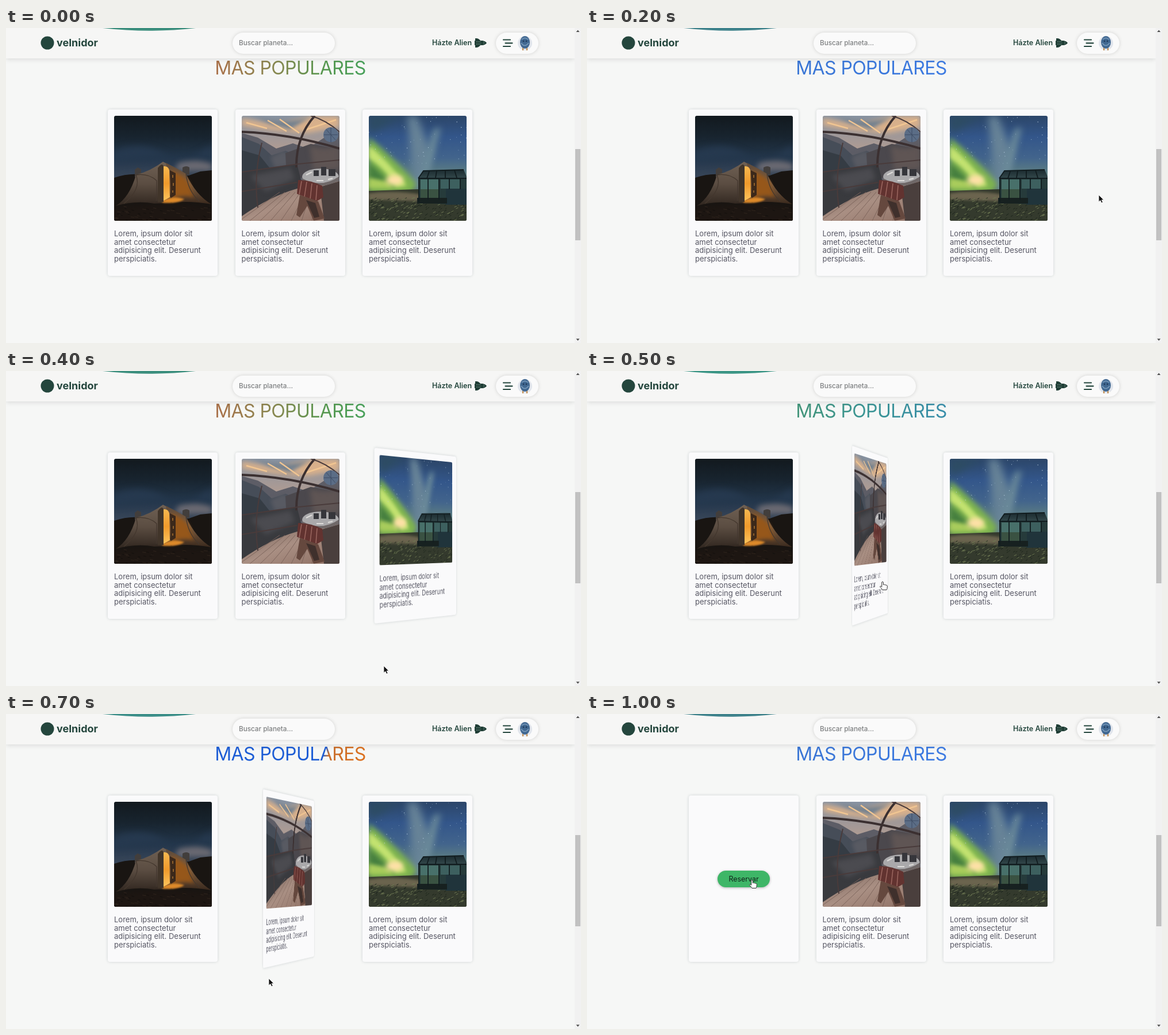
These frames come from a looping animation (1000x549 px, 1100 ms). An HTML page:

```html
<!DOCTYPE html>
<html lang="es">
<head>
<meta charset="utf-8">
<title>Mas populares</title>
<style>
  html, body { margin: 0; width: 100%; height: 100%; overflow: hidden; }
  body { position: relative; background: #f6f7f6; font-family: Inter, "Open Sans", sans-serif; }
  body > *, header > * { position: absolute; }

  header { left: 0; top: 0; width: 989px; height: 53px; background: #f6f6f5; box-shadow: 0 1px 9px rgba(0,0,0,.14); z-index: 2; }
  header svg { left: 0; top: 0; }
  .brand { left: 88px; top: 15px; font: 700 18px/22px Inter, sans-serif; color: #24463d; }
  .search, .menu { box-sizing: border-box; top: 8px; height: 37px; border-radius: 19px; background: #fafafa; box-shadow: 0 0 6px rgba(0,0,0,.15); }
  .search { left: 394px; width: 178px; padding-left: 11px; font: 500 11.7px/37px Inter, sans-serif; color: #7d7f80; }
  .menu { left: 852px; width: 74px; }
  .join { left: 741px; top: 16px; font: 600 12.5px/20px Inter, sans-serif; color: #24463d; }

  h1 { margin: 0; left: 294px; top: 54px; width: 401px; text-align: center; font: 400 32px/32px Inter, sans-serif; letter-spacing: -.6px; }
  h1 span { color: transparent; -webkit-background-clip: text; background-clip: text; }

  .slot { top: 142px; width: 191px; height: 290px; perspective: 1200px; }
  .card { width: 100%; height: 100%; transform-style: preserve-3d; }
  .face { position: absolute; inset: 0; border-radius: 4px; background: #fafafb; box-shadow: 0 0 5px rgba(20,40,50,.17); backface-visibility: hidden; }
  .back { transform: rotateY(180deg); }
  .face svg { position: absolute; left: 11px; top: 11px; border-radius: 3px; }
  .face p { position: absolute; left: 11px; top: 209px; margin: 0; font-size: 13px; line-height: 14.6px; color: #565663; white-space: nowrap; }
  .button { position: absolute; left: 50px; top: 131px; width: 91px; height: 29px; border-radius: 15px; background: #68ca88; text-align: center; font: 400 12.4px/29px Inter, sans-serif; color: #10201a; }
  .button.hover { background: #3eb667; box-shadow: 0 1px 4px rgba(0,0,0,.3); }

  .bar { left: 989px; top: 0; z-index: 3; }
  .pointer { left: 0; top: 0; z-index: 4; overflow: visible; }
</style>
</head>
<body>
<header>
  <svg width="989" height="53">
    <path id="arc" d="M168 0Q250 9.5 330 0Z"/>
    <circle cx="72" cy="26" r="11.5" fill="#24463d"/>
  </svg>
  <div class="brand">velnidor</div>
  <div class="search">Buscar planeta...</div>
  <div class="join">Házte Alien</div>
  <div class="menu"></div>
  <svg width="989" height="53">
    <path d="M816 18h2q4 0 7 4h4q5 1 7 4q-2 3-7 4h-4q-3 4-7 4h-2v-4h-1v-8h1z" fill="#1f3d35"/>
    <path d="M817 24h9M817 28h9M830 24l2 2-2 2" fill="none" stroke="#628176"/>
    <path d="M865 20.5h12M868.5 26.3h12M865 32h12" stroke="#24463d" stroke-width="2.2" stroke-linecap="round"/>
    <circle cx="902.5" cy="26.5" r="12.5" fill="#e1e5ec"/>
    <path d="M899 34v5M906 34v5" stroke="#c18b4c" stroke-width="2"/>
    <ellipse cx="902.5" cy="25" rx="8.5" ry="11" fill="#416891"/>
    <path d="M897 20q5-5 11 0M896 26q6 9 13 0" fill="none" stroke="#7c9dbd" stroke-width="1.5"/>
    <circle cx="900" cy="23" r="1.4" fill="#223c5e"/><circle cx="905" cy="23" r="1.4" fill="#223c5e"/>
  </svg>
</header>

<h1><span id="title">MAS POPULARES</span></h1>

<svg class="bar" width="11" height="549">
  <path d="M0 0h11v549H0z" fill="#f1f1f1"/>
  <path d="M1 211h9v159H1z" fill="#c1c1c1"/>
  <path d="M2.5 7l3-3.5 3 3.5zM2.5 541.5l3 3.5 3-3.5z" fill="#505050"/>
</svg>

<svg class="pointer" width="1" height="1">
  <g id="pointer" stroke-linejoin="round">
    <path id="arrow" d="M0 0V12L2.8 9.5 4.8 13.8 7 12.8 5 8.7H8.7Z" fill="#111" stroke="#fff" stroke-width=".7"/>
    <path id="hand" d="M-1.3 1Q0-.8 1.3 1V5.5Q2.6 4.4 3.8 5.8Q5 5 6 6.3Q7.4 5.6 8.2 7.2V10Q8.2 12.5 7 14.5H0Q-2 11.5-4.3 9.3Q-4.4 7.4-2.6 8L-1.3 9.3Z" fill="#fff" stroke="#333" stroke-width="1"/>
  </g>
</svg>

<script>
const $ = id => document.getElementById(id);
const shape = (d, fill, extra = '') => `<path d="${d}" fill="${fill}" ${extra}/>`;
const line = (d, color, width) => shape(d, 'none', `stroke="${color}" stroke-width="${width}"`);
const soft = n => `style="filter:blur(${n}px)"`;
const gradient = (id, colors, dir = 'x2="0" y2="1"') =>
  `<linearGradient id="${id}" ${dir}>${colors.map((c, i) =>
    `<stop offset="${i / (colors.length - 1)}" stop-color="${c}"/>`).join('')}</linearGradient>`;
const whole = 'M0 0H170V183H0Z';

// Small repeatable generator for stars and grass.
function scatter(count, seed, draw) {
  const random = () => (seed = seed * 16807 % 2147483647) / 2147483647;
  return Array.from({ length: count }, () => draw(random(), random(), random())).join('');
}

const tent =
  gradient('night', ['#12191e', '#18242f', '#23364b', '#3a475a', '#282624', '#171411']) +
  gradient('canvas', ['#6f6053', '#5b4d42', '#30261f']) +
  gradient('flap', ['#5d4a3a', '#7a5c40', '#3b2a1e']) +
  gradient('glow', ['#f7b850', '#f09a2c', '#ffc45c']) +
  shape(whole, 'url(#night)') +
  shape('M0 62Q45 43 85 65T170 50V75Q95 65 0 82Z', '#26394f', soft(6)) +
  shape('M112 82Q145 74 170 84V96H105Z', '#6b6a72', soft(5)) +
  shape('M0 108Q30 98 55 104H130L150 97 170 95V183H0Z', '#191512') +
  shape('M36 94l5-4 6 3v14H36zM119 90q7-4 12 0v13H119z', '#423e3c') +
  shape('M3 157Q27 142 38 103Q64 96 85 80Q92 83 98 88V152L70 153Q38 147 3 157Z', 'url(#canvas)') +
  shape('M90 82Q107 90 125 101Q142 138 169 154Q125 147 101 152Z', 'url(#flap)') +
  shape('M100 95Q122 104 130 117Q135 134 139 142Q118 136 101 146Z', '#96571a', soft(3)) +
  shape('M82 149Q100 138 122 145Q113 153 86 152Z', '#dd8a2a', soft(1.5)) +
  shape('M76 91Q84 81 86 88V150L76 151Z', '#41352a') +
  shape('M86 88Q94 87 96 95L97 142 86 148Z', 'url(#glow)') +
  shape('M97 95l10 5v38l-8 5z', '#3b281a') +
  line('M102 103v5M103 117v5M102 130v4', '#a8702f', 1.5) +
  line('M38 103Q60 100 74 113V148M38 103Q48 128 17 153M125 101Q128 130 148 149', '#43372e', 1.3) +
  shape('M0 161Q70 151 170 159V183H0Z', '#1d1612', soft(3)) +
  scatter(60, 29, (x, y, v) => line(`M${x * 170} ${158 + y * 25}l${3 + v * 4} 1`, v > .5 ? '#2f241c' : '#120f0d', 1));

const dome =
  gradient('dusk', ['#8792a1', '#c6a18a', '#847d7f']) +
  gradient('floor', ['#6d5a52', '#a98f83', '#8d6e62'], 'x2="1" y2="1"') +
  shape(whole, 'url(#dusk)') +
  shape('M0 4L60 15 125 0H170V20L115 30 60 26 0 17Z', '#d8b08b', soft(4)) +
  shape('M20 0Q70 16 118 3L84 24 50 14Z', '#73818f', soft(3)) +
  line('M45 8L78 27M66 6L100 30M112 24L164 7M8 12L44 22', '#f0c592', 2.5) +
  shape('M0 30L28 38 60 57 89 48 115 57 148 35 170 28V120H0Z', '#5d5d66') +
  shape('M0 37L30 49 52 69 76 61 98 70V114H0Z', '#464d58') +
  shape('M0 60L31 69 59 104H0Z', '#353c44') +
  shape('M50 72L75 60 88 88 58 92Z', '#585a62', soft(3)) +
  shape('M76 65L120 49 170 58V108H78Z', '#4b484d') +
  shape('M118 52Q146 62 170 50V94H124Z', '#5f5554', soft(4)) +
  shape('M0 99L96 84 106 123 30 163 0 183Z', '#393a3e') +
  shape('M15 105L85 90 92 110 42 132Z', '#4b4b50', soft(4)) +
  shape('M0 175Q50 140 96 127L170 114V183H0Z', 'url(#floor)') +
  [0, 1, 2, 3, 4, 5, 6, 7].map(i => line(`M${-4 + i * 18} 183L${66 + i * 9} 133`, '#7b635a', .9)).join('') +
  shape('M136 124L170 114V183H143Z', '#4a3f3d') +
  line('M0 28Q82 31 170 57M127 0Q94 37 95 90', '#3b3031', 4) +
  line('M120 0Q146 7 170 28M0 98L98 84 170 77M35 47Q20 105 28 160M0 132L96 116', '#493b3b', 2) +
  '<circle cx="155" cy="33" r="13" fill="#5b6d86"/>' +
  line('M143 33h24M155 20v26M147 24l16 18', '#3f4d64', 1) +
  '<ellipse cx="137" cy="106" rx="32" ry="14" fill="#aaa9ab"/>' +
  shape('M105 109Q138 127 169 106V113Q135 130 106 115Z', '#6f6868') +
  shape('M125 95h9v10h-9zM138 89h9v15h-9zM151 93h12v12h-12z', '#36363b') +
  line('M112 103l10-5M130 113h12M150 111l8-2', '#dedcda', 2) +
  shape('M98 112Q117 111 140 122L142 142 130 149 96 136Z', '#623330') +
  line('M104 114l-4 23M113 115l-4 26M122 118l-3 27M131 121l-2 26', '#9c6860', 1.5) +
  shape('M101 138L133 149 144 179 125 183 114 157 101 177 95 173Z', '#65483e') +
  shape('M112 147L128 152 135 176 126 178Z', '#3f302c');

const aurora =
  gradient('sky', ['#2c4669', '#33568a', '#42648c', '#66877f', '#363f35', '#1f281d']) +
  gradient('roof', ['#1b2a2f', '#33484b']) +
  shape(whole, 'url(#sky)') +
  shape('M0 0H60Q20 18 0 34Z', '#2d4c61', soft(8)) +
  shape('M67 0H83L108 62 92 130H78Z', '#678397', soft(7)) +
  shape('M112 25L125 20 96 132H81Z', '#6d8c9a', soft(6)) +
  shape('M0 38Q43 72 83 119L73 135H0Z', '#7fb54f', soft(5)) +
  shape('M0 52Q32 77 66 122L48 124Q28 92 0 74Z', '#c3e270', soft(3)) +
  shape('M0 82Q22 97 34 116H0Z', '#467f3f', soft(4)) +
  shape('M0 108L36 116 40 126H0Z', '#a9cc5c', soft(3)) +
  `<ellipse cx="45" cy="112" rx="15" ry="9" fill="#ffe0a8" ${soft(4)}/>` +
  scatter(55, 71, (x, y, v) => `<circle cx="${x * 170}" cy="${y * 85}" r="${.3 + v * .4}" fill="#b9cfe0"/>`) +
  shape('M0 131L84 128 170 132V183H0Z', '#343a2d') +
  shape('M0 135Q45 129 95 138V149L0 146Z', '#6b644e', soft(2)) +
  scatter(220, 43, (x, y, v) => line(`M${x * 170} ${144 + y * 39}l${2 + v * 3}-2`, v > .55 ? '#6d7752' : '#1c251b', 1)) +
  shape('M86 109H170V154H134L87 152Z', '#263b3b') +
  shape('M90 111H121V143H90Z', '#48706a') +
  shape('M125 111H158V127H125Z', '#3d605f') +
  shape('M90 128H121V143H90Z', '#3a5242') +
  shape('M86 109L95 96 165 94 170 106V109Z', 'url(#roof)') +
  shape('M134 127H170V155H134Z', '#20343b') +
  shape('M84 143H136V153H84Z', '#172120') +
  line('M86 109L95 96 165 94M86 109H170M87 109V150M103 109V146M122 109V146M140 108V128M159 108V128M105 97l-4 12M118 96l-2 12M133 96v12M149 95l4 13', '#111c1f', 1.8);

const text = 'Lorem, ipsum dolor sit<br>amet consectetur<br>adipisicing elit. Deserunt<br>perspiciatis.';
[tent, dome, aurora].forEach((photo, i) => document.body.insertAdjacentHTML('beforeend', `
  <div class="slot" style="left:${177 + i * 221.5}px"><div class="card">
    <div class="face"><svg width="170" height="183">${photo}</svg><p>${text}</p></div>
    <div class="face back"><div class="button">Reservar</div></div>
  </div></div>`));

const cards = [...document.querySelectorAll('.card')];
const buttons = [...document.querySelectorAll('.button')];

// title gradient, arc colour
const tints = [
  ['90deg, #aa7049, #858950 42%, #579850 72%, #48a15a', '#3b8e7d'],
  ['90deg, #429478, #3b9593 45%, #398eaa', '#3b9585'],
  ['90deg, #3975d4, #3d7be2', '#3e828b'],
  ['110deg, #1d5dd5 71%, #c8702f 74%, #df711d', '#3b8e88']
];

// pointer x, y, kind, turning card, its angle, button hovered
const steps = [
  [],
  [962, 286, 'arrow'],
  [890, 291, 'arrow'],
  [768, 398, 'hand', 2, 140],
  [657, 514, 'arrow', 2, 42],
  [514, 367, 'hand', 1, 71],
  [488, 410, 'hand', 1, 180],
  [457, 461, 'arrow', 1, 62.3],
  [313, 405, 'hand', 0, 172],
  [302, 352, 'hand', 0, 180],
  [287, 289, 'hand', 0, 180, true]
];

function show(index) {
  const [x = 0, y = 0, kind, turning, angle, hover = false] = steps[index];
  const [tint, arc] = tints[index % tints.length];
  $('title').style.backgroundImage = `linear-gradient(${tint})`;
  $('arc').setAttribute('fill', arc);
  $('pointer').setAttribute('transform', `translate(${x} ${y})`);
  for (const id of ['arrow', 'hand']) $(id).style.display = id === kind ? '' : 'none';
  cards.forEach((card, i) => {
    card.style.transform = i === turning ? `rotateY(${angle}deg)` : 'none';
    buttons[i].classList.toggle('hover', i === turning && hover);
  });
}

let shown = -1;
function tick() {
  const index = Math.floor(performance.now() % 1100 / 100);
  if (index !== shown) show(shown = index);
  requestAnimationFrame(tick);
}
tick();
</script>
</body>
</html>
```
